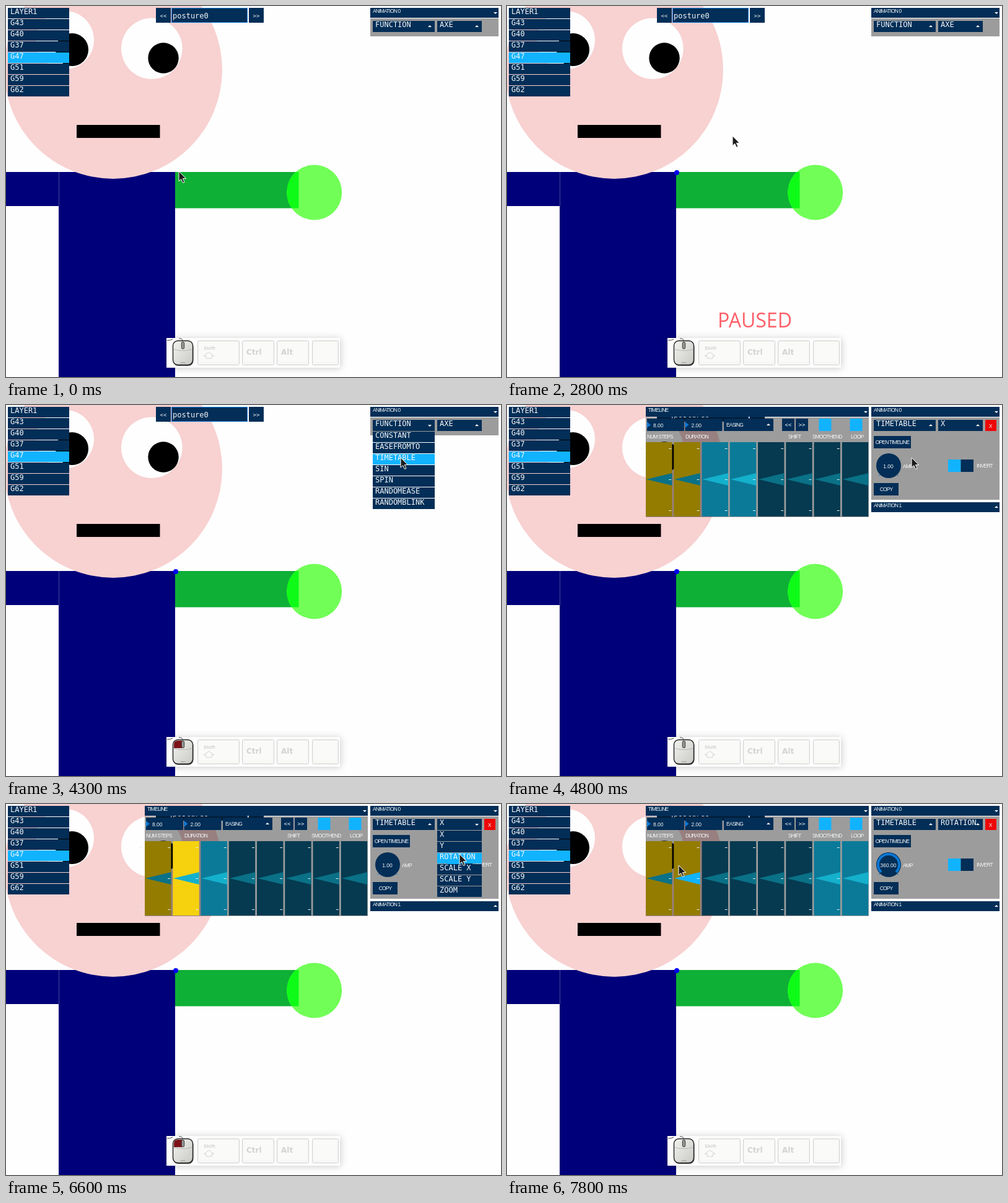
Recreate the animation shown at these times as an HTML page. Size 799 px wide and 599 px high, loop 8 s.

```html
<!DOCTYPE html>
<html lang="en">
<head>
<meta charset="utf-8">
<title>Puppet editor</title>
<style>
html, body { margin: 0; width: 100%; height: 100%; overflow: hidden; background: #fefefe; }
svg { display: block; width: 100vw; height: 100vh; }
text { fill: #f4f6f8; white-space: pre; }
.mono { font: 12px "DejaVu Sans Mono", monospace; }
.chev { font: 9px "DejaVu Sans Mono", monospace; }
.tiny { font: 8.5px "Liberation Sans", sans-serif; letter-spacing: -.85px; }
.num { font: 8.5px "Liberation Sans", sans-serif; }
.mid { text-anchor: middle; }
.key { font: bold 12px "DejaVu Sans", sans-serif; fill: #d3d3d3; }
.keySmall { font: bold 7px "DejaVu Sans", sans-serif; fill: #d3d3d3; }
.paused { font: 32px "Open Sans", sans-serif; fill: #ff5f68; text-anchor: middle; }
</style>
</head>
<body>
<svg id="stage" viewBox="0 0 799 599"></svg>
<script>
const LOOP = 8000, STEP = 100;
const NAVY = '#022e57', HOVER = '#0b77d4', ACTIVE = '#11b3ff', SHADE = 'rgba(0,0,0,.39)';
const LAYERS = ['LAYER1', 'G43', 'G40', 'G37', 'G47', 'G51', 'G59', 'G62'];
const FUNCTIONS = ['CONSTANT', 'EASEFROMTO', 'TIMETABLE', 'SIN', 'SPIN', 'RANDOMEASE', 'RANDOMBLINK'];
const AXES = ['X', 'Y', 'ROTATION', 'SCALE X', 'SCALE Y', 'ZOOM'];

// Pointer path: time, x, y
const PATH = [
  [0, 279, 267], [600, 279, 267], [900, 283, 268], [1000, 283, 268], [1300, 287, 269],
  [1400, 287, 269], [1600, 291, 270], [1800, 286, 270], [2000, 286, 270], [2300, 274, 268],
  [2700, 274, 268], [3000, 544, 93], [3100, 544, 93], [3500, 689, 31], [3700, 689, 31],
  [3800, 640, 37], [4100, 637, 85], [4700, 637, 85], [4800, 653, 85], [5300, 768, 33],
  [5400, 768, 33], [5500, 757, 33], [5800, 732, 72], [6000, 732, 74], [6400, 732, 81],
  [7000, 732, 81], [7300, 308, 95], [7400, 308, 95], [7800, 277, 99], [8000, 277, 99]
];

const within = (t, ...spans) => spans.some(([a, b]) => t >= a && t < b);
const rect = (x, y, w, h, fill, more = '') =>
  `<rect x="${x}" y="${y}" width="${w}" height="${h}" fill="${fill}" ${more}/>`;
const circle = (x, y, r, fill, more = '') =>
  `<circle cx="${x}" cy="${y}" r="${r}" fill="${fill}" ${more}/>`;
const path = (d, fill, more = '') => `<path d="${d}" fill="${fill}" ${more}/>`;
const text = (x, y, s, cls) =>
  `<text x="${x}" y="${y}" class="${cls}">${s.replace(/</g, '&lt;')}</text>`;
const arrow = (x, y, open) =>
  path(open ? `M${x - 3} ${y - 1}h6l-3 3z` : `M${x - 3} ${y + 1}h6l-3 -3z`, '#fff');

function pointer(t) {
  const i = PATH.findIndex(p => p[0] > t);
  const [a, ax, ay] = PATH[i - 1], [b, bx, by] = PATH[i];
  const k = (t - a) / (b - a);
  return [ax + (bx - ax) * k, ay + (by - ay) * k];
}

function list(x, y, w, items, chosen = -1, fill = ACTIVE) {
  return items.map((s, i) =>
    rect(x, y + 18 * i, w, 17, i === chosen ? fill : NAVY) +
    text(x + 4, y + 10 + 18 * i, s, 'mono')).join('');
}

function dropdown(x, w, label, open) {
  return rect(x, 24, w, 18, NAVY) + text(x + 4, 34, label, 'mono') + arrow(x + w - 8, 33, open);
}

function menu(x, w, items, [px, py], pressed) {
  const inside = px >= x && px < x + w && py >= 36;
  const row = inside ? Math.max(0, Math.floor((py - 43) / 18)) : -1;
  return list(x, 43, w, items, row, pressed ? ACTIVE : HOVER);
}

function bar(x, y, w, label, open) {
  return rect(x, y, w, 16, NAVY) + text(x + 4, y + 8, label, 'tiny') + arrow(x + w - 5, y + 8, open);
}

function button(x, y, w, label, cls = 'tiny mid') {
  return rect(x, y, w, 20, NAVY) + text(x + w / 2, y + 13, label, cls);
}

function puppet() {
  return rect(0, 268, 85, 55, '#00007a') + rect(85, 268, 188, 331, '#00007a') +
    rect(85, 268, .6, 55, '#7373b4') +
    circle(173, 103, 176, '#f8d1d1') +
    circle(95, 55, 47, '#fefefe') + circle(106.5, 70.5, 26.5, '#000') +
    circle(235.3, 68.7, 49.3, '#fefefe') + circle(254, 84, 24.7, '#000') +
    rect(114, 192, 134.5, 21, '#000') +
    rect(273, 268, 199.5, 58.5, '#0eb035') +
    circle(497.7, 301, 44.5, '#71ff57') +
    circle(497.7, 301, 44.5, '#0efb17', 'clip-path="url(#sleeve)"');
}

function postureBar() {
  return rect(242, 3, 24, 24, NAVY) + text(254, 19, '<<', 'chev mid') +
    rect(267.5, 3.5, 122, 23, NAVY, `stroke="${HOVER}"`) + text(269, 20, 'posture0', 'mono') +
    rect(392, 3, 24, 24, NAVY) + text(404, 19, '>>', 'chev mid');
}

function timeline(t) {
  const numberBox = (x, s) => rect(x, 22, 60, 20, NAVY) +
    path(`M${x} 27l6 5l-6 5z`, HOVER) + text(x + 10, 35.5, s, 'num');
  const label = (x, s) => text(x, 53.5, s, 'tiny');
  let s = bar(224, 3, 360, 'TIMELINE', true) + rect(224, 20, 360, 161, SHADE) +
    numberBox(226, '8.00') + numberBox(287.5, '2.00') +
    rect(350, 22, 80, 20, NAVY) + text(354, 35, 'EASING', 'tiny') + arrow(422, 32, false) +
    button(444, 22, 20, '<<', 'chev mid') + button(466, 22, 20, '>>', 'chev mid') +
    rect(503.5, 22, 20, 20, ACTIVE) + rect(553.5, 22, 20, 20, ACTIVE) +
    label(226, 'NUM STEPS') + label(288, 'DURATION') + label(454, 'SHIFT') +
    label(493, 'SMOOTHEND') + label(555, 'LOOP');

  // Eight steps over two seconds; the playing step and the next one light up
  const now = Math.floor((t - 4800) / 250 + 2.4 + 8) % 8;
  let ticks = '';
  for (let i = 0; i < 8; i++) {
    const x = 224 + 45.25 * i, lit = i === now || i === (now + 1) % 8;
    const back = i < 2 ? (lit ? '#f6d20e' : '#937c00') : (lit ? '#0b7a98' : '#053a50');
    const hover = t >= 7500 && i === 1;
    s += rect(x, 60, 42.5, 120, back) +
      path(`M${x + 1} 120L${x + 42.5} 110v20z`, hover ? ACTIVE : lit ? '#14b0cc' : '#0a7187');
    for (const y of [70, 120, 170]) ticks += rect(x - 8, y, 4, 1, '#e8eef0');
  }
  return s + ticks;
}

function animationPanel(t, at) {
  const full = t >= 4400, turned = t >= 6700;
  const funcOpen = within(t, [3500, 4400]), axisOpen = within(t, [5500, 6700]);
  let s = bar(588, 3, 207, 'ANIMATION 0', true) + rect(588, 20, 207, full ? 133 : 29, SHADE) +
    dropdown(592, 100, full ? 'TIMETABLE' : 'FUNCTION', funcOpen) +
    dropdown(696, 72, turned ? 'ROTATION' : full ? 'X' : 'AXE', axisOpen);
  if (full) {
    s += rect(772, 24, 18, 18, '#ee0505') + text(780.5, 36.5, 'X', 'num mid') +
      button(592, 50, 60, 'OPEN TIMELINE') +
      circle(616, 98, 20, NAVY) +
      (turned ? path('M604 110A17 17 0 1 1 628 110', 'none', `stroke="${HOVER}" stroke-width="4"`) : '') +
      rect(600, 113, 2, 1, HOVER) + rect(630, 113, 2, 1, HOVER) +
      text(615.5, 101.5, turned ? '360.00' : '1.00', 'num mid') + text(639, 101.5, 'AMP', 'tiny') +
      button(592, 126, 40, 'COPY') +
      rect(712, 88, 20.5, 20, ACTIVE) + rect(732.5, 88, 20.5, 20, NAVY) +
      text(758, 101, 'INVERT', 'tiny') +
      bar(588, 157, 207, 'ANIMATION 1', false);
  }
  if (funcOpen) s += menu(592, 100, FUNCTIONS, at, t >= 4300);
  if (axisOpen) s += menu(696, 72, AXES, at, t >= 6600);
  return s;
}

function keyOverlay(t) {
  const left = within(t, [1300, 1500], [2600, 2800], [4300, 4500], [6600, 6900]);
  const right = within(t, [500, 800]);
  const key = (x, w) => rect(x + .5, 540.5, w, 39, '#f7f7f6', 'rx="2" stroke="#d0d0ce"') +
    rect(x + 3, 543, w - 5, 31, '#fafaf9', 'rx="2"');
  return rect(259, 536, 280, 48, '#fdfdfd', 'style="filter:drop-shadow(1px 1px 6px rgba(0,0,0,.2))"') +
    path('M260 540q5 0 9 -2M279 537q6 -1 6 4', 'none', 'stroke="#444"') +
    rect(270, 542, 32.5, 39, '#555', 'rx="8"') +
    rect(269.5, 540.5, 32, 39, 'url(#shell)', 'rx="8" stroke="#222" stroke-width="1.4"') +
    (left ? path('M271 554v-6q0 -6 6 -6h8v12z', '#7c1319') : '') +
    (right ? path('M300 554v-6q0 -6 -6 -6h-8v12z', '#7c1319') : '') +
    path('M271 554.5q14 4 29 0', 'none', 'stroke="#aaa" stroke-width=".8"') +
    rect(283.3, 542.5, 4.4, 11, '#999', 'rx="2" stroke="#333"') +
    rect(281.5, 575, 8, 1.5, '#aaa') +
    key(309, 67) + key(381, 51) + key(437, 51) + key(494, 42) +
    text(319, 555, 'Shift', 'keySmall') +
    path('M327.5 559l8.5 6h-4v4h-9v-4h-4z', '#fafaf9', 'stroke="#d3d3d3"') +
    text(388, 563, 'Ctrl', 'key') + text(444, 563, 'Alt', 'key');
}

function render(t) {
  const at = pointer(t), [x, y] = at;
  const dot = t >= 2700 ? circle(274, 269, 4, '#0000f0')
    : t >= 700 ? circle(x, y + 1.5, 4, '#e8000c') : '';
  const paused = within(t, [700, 1200], [1600, 2100], [2500, 3000]);
  return `<defs>
    <clipPath id="sleeve"><rect x="273" y="268" width="199.5" height="58.5"/></clipPath>
    <linearGradient id="shell" x1="0" y1="0" x2="1" y2="1">
      <stop stop-color="#f2f2ef"/><stop offset="1" stop-color="#c9cac6"/></linearGradient>
    </defs>` +
    rect(0, 0, 799, 599, '#fefefe') + puppet() + dot +
    (paused ? text(400, 519, 'PAUSED', 'paused') : '') +
    list(3, 3, 99, LAYERS, 4) + postureBar() +
    (t >= 4400 ? timeline(t) : '') + animationPanel(t, at) + keyOverlay(t) +
    path('M0 0V16L3.7 12.6L6.4 18.5L9 17.4L6.4 11.6H11.5Z', '#1c1c1c',
      `stroke="#fff" transform="translate(${x} ${y})"`);
}

const stage = document.getElementById('stage');
let shown = -1;
function tick() {
  const t = Math.floor(performance.now() % LOOP / STEP) * STEP;
  if (t !== shown) stage.innerHTML = render(shown = t);
  requestAnimationFrame(tick);
}
tick();
</script>
</body>
</html>
```
